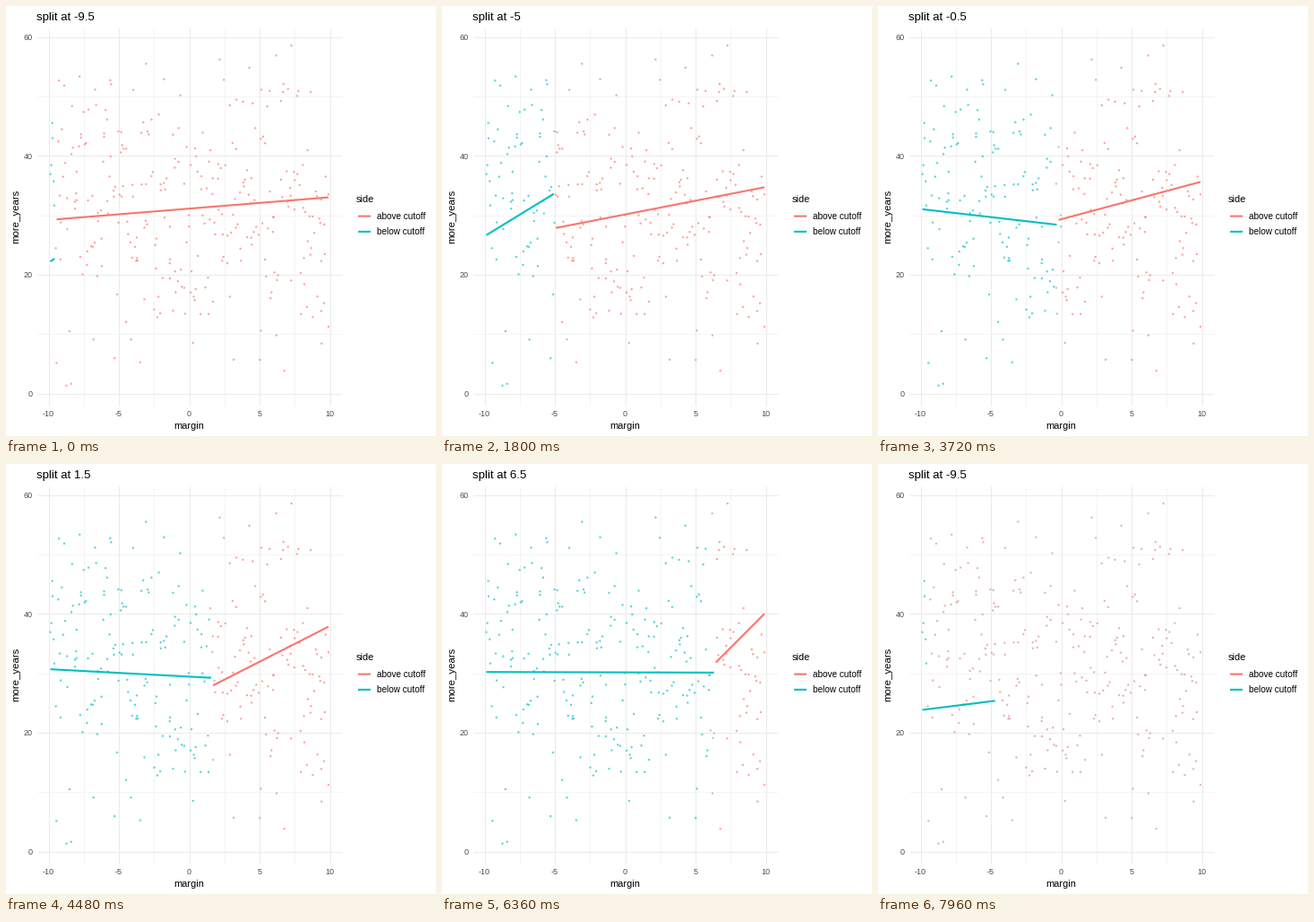
A matplotlib script that plays this animation: 480 by 480 pixels, repeating every 8 s.

```python
import numpy as np
import matplotlib.pyplot as plt
from matplotlib.animation import FuncAnimation

plt.rcParams["font.family"] = "Liberation Sans"

SIZE, DPI = 480, 100
PT = 72 / DPI                       # points per pixel
STATES, STEPS = 40, 5               # cutoffs -9.5 .. 10, frames for each
FIRST, STEP = -9.5, 0.5
X_MIN, X_MAX = -9.87, 9.9
GAP = 0.07                          # from the cutoff to each line's end
LEFT, RIGHT, TOP, BOTTOM = 34.5, 375, 24.5, 445.5
GRID, TICK = "#EBEBEB", "#4D4D4D"
RED, TEAL = np.array([248, 118, 109]) / 255, np.array([0, 191, 196]) / 255

# Key fits: cutoff, then left and right values below and above it
FITS = np.array([
    (-9.5, 22.2, 22.7, 29.3, 33.0),
    (-6.875, 24.3, 35.1, 28.9, 33.6),
    (-3.125, 29.0, 32.1, 26.8, 35.8),
    (-0.25, 31.0, 28.4, 29.2, 35.6),
    (3.625, 30.3, 30.1, 26.6, 40.2),
    (6.375, 30.2, 30.1, 31.8, 40.0),
    (10, 28.7, 33.3, 33.0, 39.6),
])


def px(x):
    return 204.5 + 15.7 * np.asarray(x)


def py(y):
    return 432.5 - 6.633 * np.asarray(y)


def mix(a, b, t):
    return (1 - t) * a + t * b


def blend(a, b, t):
    """Mix two colours in linear light."""
    return mix(a ** 2.2, b ** 2.2, t) ** (1 / 2.2)


def make_data(n=300):
    """Even cover in x, bell-shaped in y, kept inside the panel."""
    rng = np.random.default_rng(12)
    x = np.linspace(X_MIN, X_MAX, n) + rng.uniform(-0.1, 0.1, n)
    y = rng.normal(30.5, 13.5, n)
    y = np.where((y < 0.9) | (y > 58.6), rng.uniform(0.9, 58.6, n), y)
    return np.clip(x, X_MIN, X_MAX), y


def fits(cut):
    """Ends (x, y) of the lines below and above the cutoff."""
    bl, br, al, ar = (np.interp(cut, FITS[:, 0], col) for col in FITS.T[1:])
    return (np.array([(X_MIN, bl), (min(cut - GAP, X_MAX), br)]),
            np.array([(cut + GAP, al), (X_MAX, ar)]))


fig = plt.figure(figsize=(SIZE / DPI, SIZE / DPI), dpi=DPI, facecolor="white")
ax = fig.add_axes([0, 0, 1, 1])
ax.set_xlim(0, SIZE)
ax.set_ylim(SIZE, 0)
ax.axis("off")


def stroke(xs, ys, color, width, z, **kw):
    return ax.plot(xs, ys, color=color, lw=width * PT, zorder=z,
                   solid_capstyle="butt", **kw)[0]


def label(x, y, text, size, color="black", **kw):
    kw.setdefault("va", "baseline")
    return ax.text(x, y, text, fontsize=size * PT, color=color, **kw)


for v in np.arange(-10, 10.1, 2.5):
    stroke([px(v)] * 2, [TOP, BOTTOM], GRID, 0.53 if v % 5 else 1.07, 1)
for v in range(0, 61, 10):
    stroke([LEFT, RIGHT], [py(v)] * 2, GRID, 0.53 if v % 20 else 1.07, 1)
for v in range(-10, 11, 5):
    label(px(v), 457.5, str(v), 9, TICK, ha="center")
for v in range(0, 61, 20):
    label(29.5, py(v) + 3.5, str(v), 9, TICK, ha="right")

label(204.5, 472, "margin", 11, ha="center")
label(11, 235, "more_years", 11.4, rotation=90, ha="center", va="center")
label(391, 219, "side", 11)
for y, color, name in [(234.6, RED, "above cutoff"), (251.9, TEAL, "below cutoff")]:
    stroke([393, 407], [y, y], color, 2.1, 3, snap=False)
    label(414, y + 3.2, name, 10)

margin, years = make_data()
title = label(LEFT, 16, "", 13.2)
dots = ax.scatter(px(margin), py(years), s=(2.4 * PT) ** 2, lw=0,
                  alpha=0.65, zorder=2)
above = stroke([], [], RED, 2.1, 3, snap=False)
below = stroke([], [], TEAL, 2.1, 4, snap=False)


def set_line(line, ends):
    line.set_data(px(ends[:, 0]), py(ends[:, 1]))


def update(i):
    k, j = divmod(i, STEPS)
    t = max(0, j - 1) / (STEPS - 1)     # two frames of rest, then a linear move
    cut = FIRST + STEP * k
    nxt = FIRST + STEP * ((k + 1) % STATES)

    title.set_text(f"split at {nxt if t > 0.5 else cut:g}")
    share = mix(margin <= cut, margin <= nxt, t)
    dots.set_facecolor(blend(RED, TEAL, share[:, None]))

    if nxt > cut:
        low, high = fits(mix(cut, nxt, t))
    else:
        low, high = mix(fits(cut)[0], fits(nxt)[0], t), None
    set_line(below, low)

    # Nothing lies above the last cutoff
    has_above = high is not None and high[0, 0] < X_MAX and (nxt < X_MAX or t == 0)
    above.set_visible(has_above)
    if has_above:
        set_line(above, high)
    return title, dots, above, below


anim = FuncAnimation(fig, update, frames=STATES * STEPS, interval=40,
                     init_func=lambda: update(0), repeat=True, repeat_delay=0)
plt.show()
```
